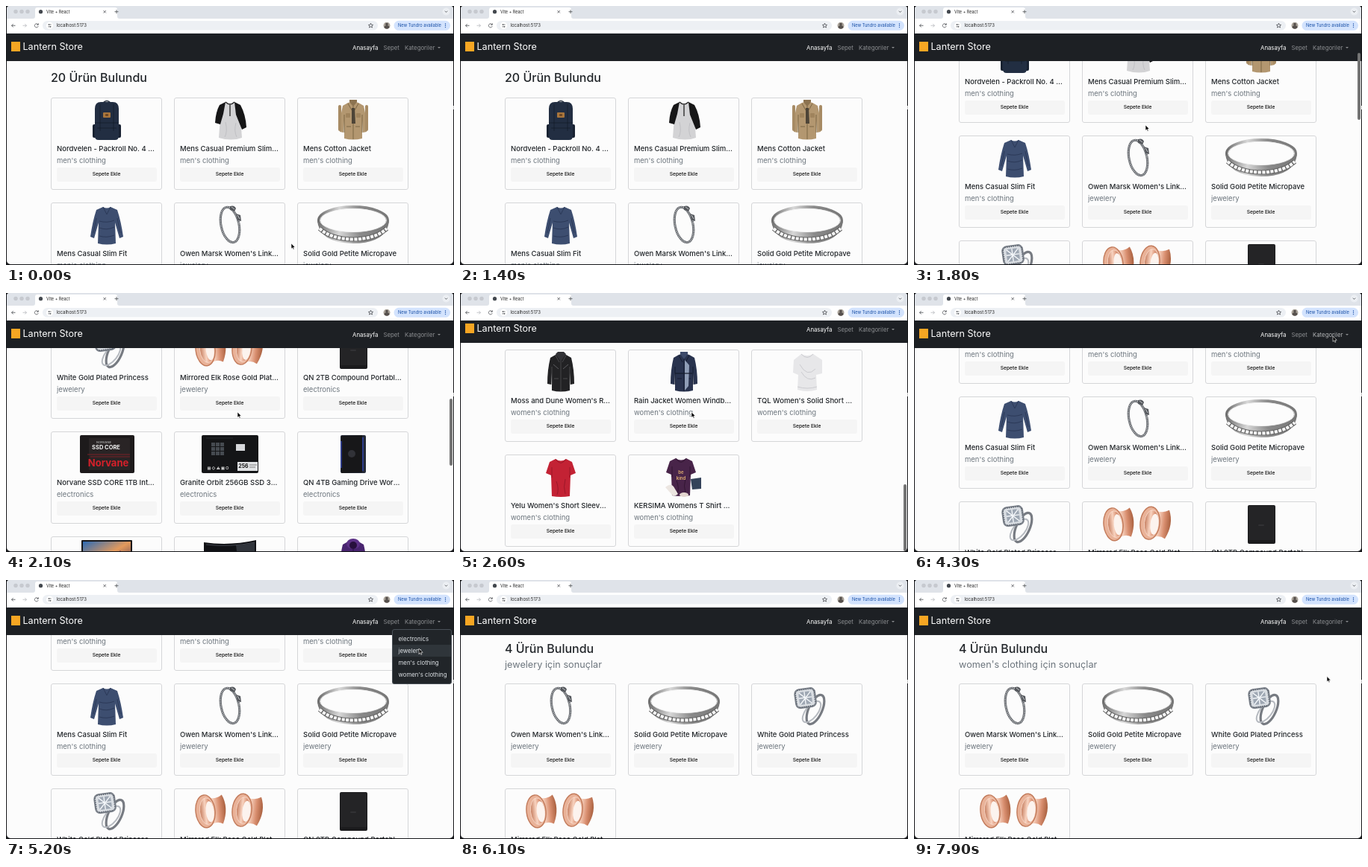
An HTML page that plays this animation: 600x348 px, repeating every 8 s.

```html
<!DOCTYPE html>
<html lang="tr">
<head>
<meta charset="utf-8">
<title>Vite + React</title>
<style>
html, body { margin: 0; width: 100%; height: 100%; overflow: hidden; background: #17181b; }
body, svg { font-family: Inter, "Liberation Sans", sans-serif; }
#stage { position: relative; width: 600px; height: 348px; overflow: hidden; background: #17181b; }
#win { position: absolute; left: .5px; top: 0; width: 598px; height: 347px; overflow: hidden; border-radius: 4px 4px 5px 5px; background: #fcfcfc; }
#win > *, .page > *, .card > *, nav > * { position: absolute; }
.page { left: -.5px; top: 0; width: 600px; color: #212529; }
.page h2 { margin: 0; left: 60px; font: 500 16px/20px Inter, sans-serif; }
.page h3 { margin: 0; left: 60px; top: 104px; font: 400 12.7px/20px Inter, sans-serif; color: #6c757d; }
.card { width: 146.6px; height: 122.6px; border: .7px solid #d5d6d8; border-radius: 3px; background: #fcfcfc; }
.card svg { left: 0; top: 0; width: 148px; height: 62px; }
.card b, .card i { left: 7px; width: 133px; white-space: nowrap; overflow: hidden; text-overflow: ellipsis; }
.card b { top: 61px; font: 500 9.5px/14px Inter, sans-serif; }
.card i { top: 77px; font: 400 9.5px/14px Inter, sans-serif; color: #6c757d; }
.card u { left: 6.5px; top: 93.5px; width: 134px; height: 19px; border-radius: 3px; background: #f5f5f5;
  font: 500 6.7px/19px Inter, sans-serif; text-align: center; text-decoration: none; color: #111; }
nav { left: 0; top: 37px; width: 600px; height: 37px; background: #1d2024; color: #8b8d90; font-size: 7.8px; line-height: 12px; }
nav span { top: 13px; white-space: nowrap; }
nav .brand { left: 22px; top: 8px; font-size: 12.6px; line-height: 20px; color: #fff; }
nav .logo { left: 6px; top: 11px; width: 12px; height: 13px; background: #f6a623; }
nav .caret { left: 577px; top: 17.5px; border: 2.2px solid transparent; border-top-color: currentColor; border-bottom: 0; }
#menu { left: 516px; top: 66px; width: 80px; padding: 4px 0; border: .5px solid #495057; border-radius: 3px; background: #212529; color: #dee2e6; font-size: 7.8px; box-sizing: border-box; }
#menu div { height: 16px; line-height: 16px; padding-left: 8px; }
#menu .on { background: #2f353a; }
#thumb { left: 593px; width: 4px; height: 90px; border-radius: 2px; background: #747474; }
#bar { left: -.5px; top: 0; }
#cursor { position: absolute; left: 0; top: 0; overflow: visible; }
#mark { position: absolute; left: 598.5px; top: 134px; width: 1.5px; height: 5px; background: #c9c9c9; }
</style>
</head>
<body>
<div id="stage">
  <div id="win">
    <div class="page" id="all"></div>
    <div class="page" id="some"></div>
    <nav id="nav">
      <div class="logo"></div><span class="brand">Lantern Store</span>
      <span style="left:463.5px;color:#fff">Anasayfa</span>
      <span style="left:505px">Sepet</span>
      <span id="cat" style="left:533.5px">Kategoriler</span><div class="caret"></div>
    </nav>
    <div id="menu"></div>
    <div id="thumb"></div>
    <svg id="bar" width="600" height="37">
      <defs>
        <linearGradient id="silver"><stop stop-color="#6e6e6e"/><stop offset=".3" stop-color="#d8d8d8"/><stop offset=".6" stop-color="#8a8a8a"/><stop offset="1" stop-color="#777"/></linearGradient>
        <linearGradient id="rose"><stop stop-color="#c47b5c"/><stop offset=".4" stop-color="#f8d3c0"/><stop offset=".7" stop-color="#d98f70"/><stop offset="1" stop-color="#a9603f"/></linearGradient>
        <linearGradient id="sky" x2="1" y2="1"><stop stop-color="#2c6bb5"/><stop offset=".5" stop-color="#e39a5c"/><stop offset="1" stop-color="#3b2a55"/></linearGradient>
      </defs>
      <path d="M0 0H600V37H0Z" fill="#dfe3e9"/>
      <path d="M0 17H600V37H0ZM36 17Q39 17 39 14V5Q39 2 42 2H146Q149 2 149 5V14Q149 17 152 17Z" fill="#fff"/>
      <path d="M0 36.6H600" stroke="#d8dadd" stroke-width=".6"/>
      <g fill="#c6c9cf"><circle cx="13" cy="7.5" r="2.7"/><circle cx="21" cy="7.5" r="2.7"/><circle cx="29" cy="7.5" r="2.7"/></g>
      <circle cx="46.5" cy="7.7" r="2.6" fill="#43484e"/>
      <circle cx="589.5" cy="7.5" r="5" fill="#eceff3"/>
      <rect x="49" y="20" width="449" height="12.6" rx="6.3" fill="#edf0f4"/>
      <circle cx="58.5" cy="26.3" r="4.6" fill="#fff"/>
      <g fill="none" stroke="#474a4e" stroke-width=".8">
        <path d="M130.500 6l3.400 3.400M133.900 6l-3.400 3.400M145.500 7.700h5M148 5.200v5M587.800 6.700l1.700 1.700 1.700-1.700M12.500 26.300h-5m2.200-2.200l-2.200 2.200 2.200 2.200M43 25a2.500 2.500 0 1 0 .2 2.200M43.300 23.300v2h-2"/>
        <path d="M22.500 26.300h5m-2.200-2.200l2.200 2.200-2.200 2.200" stroke="#b5b8bc"/>
        <path d="M56.500 25h4M56.500 27.800h4M57.500 24.200v1.600M59.500 27v1.600M488.500 23.200l.9 2 2.200.2-1.700 1.400.6 2.200-2-1.200-2 1.200.6-2.200-1.700-1.400 2.200-.2z"/>
      </g>
      <circle cx="510" cy="26.300" r="4.500" fill="#aaa39a"/><path d="M506.500 29a3.500 3 0 0 1 7 0 4.500 4.500 0 0 1-7 0z" fill="#56504d"/><circle cx="510" cy="24.500" r="1.800" fill="#56504d"/>
      <rect x="519.500" y="19.800" width="75.500" height="13" rx="6.500" fill="#d3e3fd"/>
      <g fill="#174ea6"><circle cx="588.500" cy="24" r=".7"/><circle cx="588.500" cy="26.300" r=".7"/><circle cx="588.500" cy="28.600" r=".7"/></g>
      <text x="54" y="9.800" font-size="5.500" fill="#222">Vite + React</text>
      <text x="67.500" y="28.400" font-size="6" fill="#222">localhost:5173</text>
      <text x="525" y="28.300" font-size="5.700" fill="#174ea6">New Tundro available</text>
    </svg>
  </div>
  <div id="mark"></div>
  <svg id="cursor" width="8" height="10"><path d="M0 0V7.300L1.700 5.800 2.800 8.300 4 7.800 2.900 5.300H5.200Z" fill="#000" stroke="#fff" stroke-width=".6"/></svg>
</div>
<script>
const $ = id => document.getElementById(id);

// Drawing helpers; product art is centred on x = 0
const fill = (d, c) => `<path d="${d}" fill="${c}"/>`;
const line = (d, c, w = .7, more = '') => `<path d="${d}" fill="none" stroke="${c}" stroke-width="${w}" ${more}/>`;
const box = (x, y, w, h, c, r = 1) => `<rect x="${x}" y="${y}" width="${w}" height="${h}" rx="${r}" fill="${c}"/>`;
const oval = (x, y, rx, ry, c, stroke = 'none', w = 1, more = '') =>
  `<ellipse cx="${x}" cy="${y}" rx="${rx}" ry="${ry}" fill="${c}" stroke="${stroke}" stroke-width="${w}" ${more}/>`;
const label = (x, y, size, c, s) => `<text x="${x}" y="${y}" font-size="${size}" fill="${c}" font-weight="700" text-anchor="middle">${s}</text>`;
const coat = (c, dark) => fill('M-7 6Q0 3 7 6L14 10Q18 26 18 45L13 46 12 30 12 54Q0 57-12 54L-12 30-13 46-18 45Q-18 26-14 10Z', c)
  + line('M0 8V55M-12 22V46M12 22V46M-7 7L-2 16M7 7L2 16M-9 38h6M3 38h6', dark, .9);
const tee = (c, dark) => fill('M-7 5Q0 10 7 5L15 9 20 24 13 27 12 55Q0 57-12 55L-13 27-20 24-15 9Z', c)
  + line('M-7 5Q0 16 7 5M-12 16V30M12 16V30M-6 35Q-2 45-5 53M6 32Q3 43 6 52', dark);
const band = (x, s) => `<g transform="translate(${x} 29) rotate(${s * 6})">`
  + fill('M-9-22Q4-12 16-20Q24-2 14 19Q4 13-7 22Z', 'url(#rose)') + oval(-8, 0, 13, 22, '#e9b298', '#c27a5a', 1.4)
  + oval(-6, 0, 9.5, 18, 'url(#rose)', '#f9dccd', .8) + oval(-2, 1, 5.500, 14, '#fcf3ee') + '</g>';

const art = {
  pack: line('M-5 6Q0 1 5 6', '#1b2434', 1.5) + box(-19, 35, 38, 18, '#192232', 2)
    + fill('M-16 14Q-16 5-8 5H8Q16 5 16 14V51Q16 56 11 56H-11Q-16 56-16 51Z', '#222e42')
    + line('M-16 33H16M-9 8V44M9 8V44M-13 40H13', '#121a28') + box(-5, 19, 10, 7, '#a8753c') + box(-2, 21, 4, 3, '#6d4723'),
  raglan: fill('M-6 5Q0 9 6 5L13 12 16 53Q2 58-15 53L-12 12Z', '#d3d3d5') + fill('M-6 5L-14 9Q-19 18-20 33L-13 35-9 21Z', '#161617')
    + fill('M6 5L14 9Q21 22 22 39L16 42 8 22Z', '#161617') + line('M-6 5Q0 11 6 5M0 9V24', '#222', 1.3) + line('M-6 32Q-3 45-7 52M8 33Q5 44 9 52', '#b7b7ba'),
  parka: coat('#b39770', '#75603f') + fill('M-5 5L0 11 5 5V2H-5Z', '#8c7350') + fill('M-2 13H2L3 34H-2Z', '#4d4437')
    + box(-10, 20, 6, 6, '#a0845d') + box(4, 20, 6, 6, '#a0845d') + box(16, 9, 4, 35, '#a78b64', 2) + box(-20, 9, 4, 35, '#a78b64', 2),
  knit: fill('M-5 5Q0 8 5 5L14 9Q19 24 22 45L17 47 11 26 12 54Q0 57-12 54L-11 26-17 47-22 45Q-19 24-14 9Z', '#3d4e70')
    + line('M-5 5L0 15 5 5M-10 24Q0 27 10 23M-10 33Q0 37 10 32M-10 44Q0 47 10 43M-14 20l-4 20M14 20l4 20', '#2a3755', .9),
  chain: oval(0, 29, 12, 24, 'none', '#62656a', 3.200, 'transform="rotate(-12 0 29)"') + oval(0, 29, 12, 24, 'none', '#b9bcbf', 2.200, 'stroke-dasharray="1 1.200" transform="rotate(-12 0 29)"')
    + fill('M0 4Q6 2 8 7L6 11 0 9ZM8 14L14 16 15 24 10 23Z', '#55585d') + line('M2 5l4 3M10 16l3 5', '#d0d2d4', .9),
  hoop: oval(0, 23, 46, 18, 'none', 'url(#silver)', 4) + oval(0, 23, 44.500, 15.500, 'none', '#f2f2f2', .8)
    + fill('M-48 22Q-47 53 0 54Q47 53 48 22Q42 40 0 41Q-42 40-48 22Z', 'url(#silver)') + line('M-45 34Q-30 48 0 48.500Q30 48 45 34', '#606060', 6)
    + line('M-45 34Q-30 48 0 48.500Q30 48 45 34', '#f4f4f4', 4.200, 'stroke-dasharray="4.200 1.300"'),
  princess: oval(11, 34, 9, 21, 'none', '#777b82', 3.200, 'transform="rotate(24 11 34)"') + oval(6, 37, 8, 17, 'none', '#b6bac0', 2, 'transform="rotate(38 6 37)"')
    + `<g transform="rotate(-8 -2 18)">${box(-17, 5, 29, 27, '#7c828b', 7) + box(-15, 7, 25, 23, '#d9dde2', 6) + box(-11, 10, 17, 17, '#9ea7b3', 4)}`
    + line('M-10 11L5 26M5 11L-10 26M-3 10V27M-11 18H6', '#f3f6f9', 1.4) + line('M-15 10V27M10 10V27M-12 7H7M-12 30H7', '#565d68', 1.600, 'stroke-dasharray="1.300 1.500"') + '</g>',
  tunnels: band(-25, -1) + band(24, 1),
  drive: box(-18, 4, 37, 52, '#1b1b1d', 2) + box(-17, 5, 35, 46, '#242426', 1) + box(-4, 30, 8, 2, '#323235'),
  ssd: box(-36, 4, 73, 51, '#1d1a1b', 2) + box(-24, 8, 55, 43, '#292425') + label(-4, 15, 4, '#999', 'NORVANE') + label(-1, 23, 7.500, '#f4f4f4', 'SSD CORE')
    + line('M-26 30H31M-22 33H31', '#7b2027', 1) + label(2, 46, 13, '#d5202a', 'Norvane'),
  slim: box(-38, 4, 76, 51, '#141517', 2) + [0, 1, 2, 3, 4, 5, 6, 7, 8].map(i => box(-25 + i % 3 * 6, 14 + (i / 3 | 0) * 6, 5, 5, '#454a50', 0)).join('')
    + box(8, 16, 12, 9, '#d7d9dc', 0) + box(10, 40, 27, 12, '#e1e3e5', 0) + label(18, 48, 7, '#171717', '256') + line('M26 44h10M26 47h8', '#555', .7)
    + label(-16, 50, 5, '#ddd', '▤ ◇ ⚠ ▣ ○') + line('M-32 8h36', '#2c3034'),
  game: box(-17, 4, 34, 51, '#242a38', 2) + fill('M-16 5L12 4 12 54-16 55Z', '#171719') + line('M-16 12V48M13 7V52', '#3549b9', 1.3) + oval(-2, 29, 5, 5, '#313238'),
  screen: box(-34, 4, 68, 42, '#171719') + box(-32, 6, 64, 37, 'url(#sky)', 0) + line('M-30 32L-12 22 4 32 18 20 30 29', '#7f3855', 3) + fill('M-3 46H3L8 54H-8Z', '#2b2b2e'),
  curve: fill('M-35 7Q0 12 35 4V43Q0 50-35 42Z', '#101115') + fill('M8 11Q24 10 33 7V40Q24 42 12 42Z', '#30343b') + line('M-32 10Q0 14 33 7', '#565b65') + fill('M-4 46H4L14 55H-12Z', '#212329'),
  snow: coat('#48246f', '#281042') + oval(0, 9, 9, 7, '#5c3186') + oval(0, 11, 5, 5, '#27103c'),
  leather: coat('#222224', '#4c4c50') + fill('M-7 5L0 15 7 5 4 2H-4Z', '#333337') + line('M-10 19L-3 25M10 19L3 25', '#77777b'),
  rain: coat('#29334e', '#141a2d') + fill('M-5 5L0 12 5 5V2H-5Z', '#3c4a6a') + fill('M1 13L7 20 6 48 1 54Z', '#8f9db6') + line('M-12 31H11', '#151b2d', 1.2),
  blouse: fill('M-8 5Q0 9 8 5L20 13 20 31 12 33 13 53Q0 57-13 53L-12 33-19 30-18 13Z', '#e7e7e9') + line('M-8 5Q0 14 8 5M-10 19Q0 37 11 25M-8 29Q0 43 11 37M-13 49Q0 53 13 49', '#c8c8cc', .9),
  tee: tee('#c32234', '#8b1425'),
  print: `<g transform="translate(-4 -1)">${tee('#482449', '#291129')}</g>` + label(-4, 25, 6, '#d4a36e', 'be') + label(-4, 33, 6, '#d4a36e', 'kind')
    + fill('M9 32L23 30 23 45 11 46Z', '#34435a') + fill('M-25 43Q-18 37-14 42L-8 52Q-14 57-17 52Z', '#ece6e1') + oval(0, 53, 6, 3, '#e4d6d0'),
};

const MEN = "men's clothing", WOMEN = "women's clothing", GEM = 'jewelery', TECH = 'electronics';
const goods = [
  ['Nordvelen - Packroll No. 4 Bag for Laptops', MEN, 'pack'],
  ['Mens Casual Premium Slim Fit T-Shirts', MEN, 'raglan'],
  ['Mens Cotton Jacket', MEN, 'parka'],
  ['Mens Casual Slim Fit', MEN, 'knit'],
  ["Owen Marsk Women's Linked Bracelet", GEM, 'chain'],
  ['Solid Gold Petite Micropave', GEM, 'hoop'],
  ['White Gold Plated Princess', GEM, 'princess'],
  ['Mirrored Elk Rose Gold Plated Double', GEM, 'tunnels'],
  ['QN 2TB Compound Portable External', TECH, 'drive'],
  ['Norvane SSD CORE 1TB Internal', TECH, 'ssd'],
  ['Granite Orbit 256GB SSD 3D NAND', TECH, 'slim'],
  ['QN 4TB Gaming Drive Works with Consoles', TECH, 'game'],
  ['Oltan KD310X bi 21.5 inches Full HD', TECH, 'screen'],
  ['Tervona 49-Inch Curved Gaming Monitor', TECH, 'curve'],
  ["MAROVELIND Women's 3-in-1 Snowboard", WOMEN, 'snow'],
  ["Moss and Dune Women's Removable Hooded", WOMEN, 'leather'],
  ['Rain Jacket Women Windbreaker Striped', WOMEN, 'rain'],
  ["TQL Women's Solid Short Sleeve Boat Neck", WOMEN, 'blouse'],
  ["Yelu Women's Short Sleeve Moisture", WOMEN, 'tee'],
  ['KERSIMA Womens T Shirt Casual Cotton', WOMEN, 'print'],
];
const cards = (list, top) => list.map(([name, kind, pic], i) =>
  `<div class="card" style="left:${60 + i % 3 * 165}px;top:${top + (i / 3 | 0) * 141}px">
  <svg viewBox="-74 0 148 62">${art[pic]}</svg><b>${name}</b><i>${kind}</i><u>Sepete Ekle</u></div>`).join('');

$('all').innerHTML = '<h2 style="top:86px">20 Ürün Bulundu</h2>' + cards(goods, 122.5);
$('some').innerHTML = '<h2 style="top:82px">4 Ürün Bulundu</h2><h3 id="sub"></h3>' + cards(goods.slice(4, 8), 138.5);
$('menu').innerHTML = [TECH, GEM, MEN, WOMEN].map(s => `<div>${s}</div>`).join('');

// Keys are [time, ...values], joined by straight lines
function track(keys, t) {
  const n = keys.findIndex(k => k[0] > t);
  if (n < 1) return keys[n ? keys.length - 1 : 0].slice(1);
  const a = keys[n - 1], b = keys[n], p = (t - a[0]) / (b[0] - a[0]);
  return a.slice(1).map((v, i) => v + (b[i + 1] - v) * p);
}
const scrollKeys = [[1600, 0], [1800, 90], [2100, 360], [2400, 690], [2600, 752], [2950, 752], [3150, 600], [3400, 330], [3650, 170], [3900, 125]];
const mouseKeys = [[300, 382, 319], [1200, 340, 215], [1700, 310, 160], [3600, 310, 160], [3900, 450, 95], [4200, 561, 58],
  [4800, 561, 58], [5200, 553, 92], [5700, 553, 92], [6400, 556, 80], [6700, 561, 58], [7100, 561, 58], [7500, 553, 129.500]];
const within = (t, a, b) => t >= a && t < b;
const PICK = 5500, REPICK = 7700;

function draw(now) {
  const t = Math.floor(now % 8000 / 100) * 100;
  const [y] = track(scrollKeys, t), [mx, my] = track(mouseKeys, t);
  const picked = t >= PICK;
  $('all').style.display = picked ? 'none' : '';
  $('some').style.display = picked ? '' : 'none';
  $('all').style.transform = `translateY(${-y}px)`;
  $('sub').textContent = `${t < REPICK ? GEM : WOMEN} için sonuçlar`;
  $('nav').style.transform = `translateY(${-Math.max(0, y - 745)}px)`;
  $('thumb').style.top = 37 + y / 752 * 220 + 'px';
  $('thumb').style.opacity = within(t, 1650, 4100) ? 1 : 0;

  const open = within(t, 4500, PICK) || within(t, 6900, REPICK);
  $('menu').style.display = open ? '' : 'none';
  [...$('menu').children].forEach((el, i) => el.className = Math.floor((my - 70) / 16) === i ? 'on' : '');
  $('cat').style.color = my < 70 ? '#b3b5b7' : '';
  $('cursor').style.transform = `translate(${mx}px,${my}px)`;
  $('cursor').style.opacity = within(t, 1200, 1600) || within(t, 5800, 6400) ? 0 : 1;
}
const start = performance.now();
(function loop() {
  draw(performance.now() - start);
  requestAnimationFrame(loop);
})();
</script>
</body>
</html>
```
